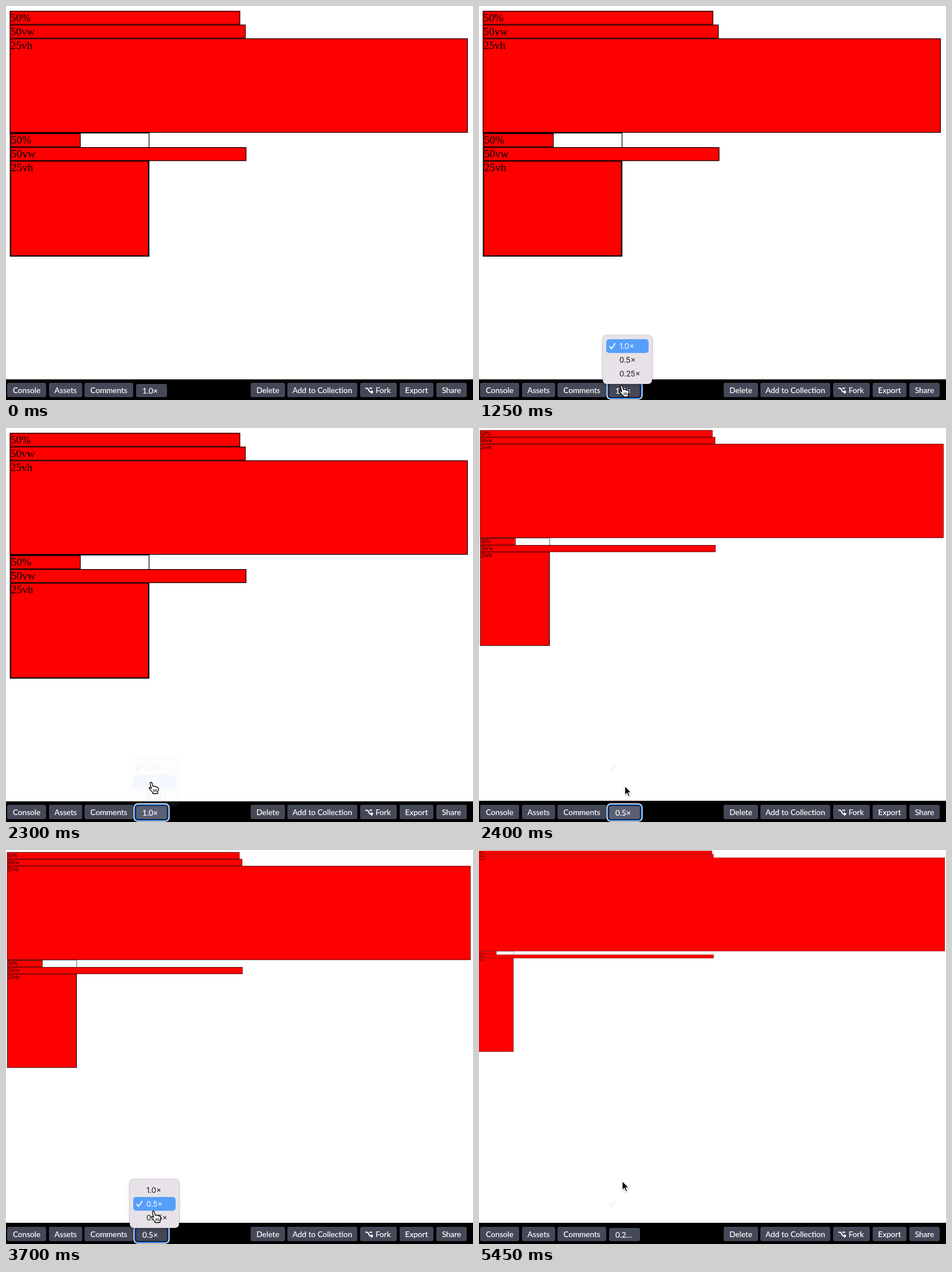
An HTML page for the animation above (5.55 s loop, 815 by 687 pixels).

```html
<!DOCTYPE html>
<html lang="en">
<head>
<meta charset="utf-8">
<title>Viewport units and zoom</title>
<style>
html, body { margin: 0; width: 100%; height: 100%; overflow: hidden; background: #fff; }
#stage { position: relative; width: 815px; height: 687px; overflow: hidden; --s: 1; }

.page {
  position: absolute; left: -3.5px; top: -.6px;
  box-sizing: border-box; width: calc(682px / var(--s)); padding: 8px;
  transform-origin: 0 0; transform: scale(calc(1.2 * var(--s)));
  font: 16px/18px "Liberation Serif", "Times New Roman", serif; color: #000;
}
.page div { border: 1px solid #000; }
.page .box { background: #f00; }
.page .half { width: 50%; }
.page .vw { width: calc(341px / var(--s)); }
.page .vh { height: calc(135.25px / var(--s)); }
.page .frame { width: 200.6px; }

.bar { position: absolute; left: 0; top: 651px; width: 815px; height: 36px; background: #000; }
.btn, #zoom {
  position: absolute; top: 657px; height: 25px; border-radius: 3px;
  background: #444857; color: #fff; white-space: nowrap;
  font: 13.6px/26px Lato, sans-serif; text-align: center;
  -webkit-text-stroke: .2px #fff;
}
.btn svg { position: absolute; left: 9px; top: 7px; }
#zoom { left: 227px; top: 659px; width: 43px; height: 23px; padding-left: 11px; line-height: 24px; text-align: left; }
#zoom.lit { background: #5a5f73; }
#zoom.focus { box-shadow: 0 0 0 1px #000, 0 0 0 3px #0d63d2, 0 0 0 4.5px #fff; }

#menu {
  position: absolute; left: 216px; top: 574px; width: 86px; height: 85px;
  border-radius: 7px; background: #e7e2e8;
  box-shadow: 0 0 0 .6px rgba(0,0,0,.25), 0 2px 6px rgba(0,0,0,.16);
}
.row {
  position: absolute; left: 6px; width: 51px; height: 24px; padding-left: 23px;
  border-radius: 5px; color: #1d1b1e; font: 13.2px/24px Inter, sans-serif;
}
.row.on { background: #559ffb; color: #fff; }
.row svg { position: absolute; left: 5px; top: 6px; visibility: hidden; }
.row.sel svg { visibility: visible; }

#cursor { position: absolute; left: 0; top: 0; overflow: visible; }
</style>
</head>
<body>
<div id="stage">
  <div class="page">
    <div class="box half">50%</div>
    <div class="box vw">50vw</div>
    <div class="box vh">25vh</div>
    <div class="frame">
      <div class="box half">50%</div>
      <div class="box vw">50vw</div>
      <div class="box vh" style="width:auto">25vh</div>
    </div>
  </div>

  <div class="bar" id="bar"></div>
  <div class="btn" style="left:2px;width:68px">Console</div>
  <div class="btn" style="left:75px;width:58px">Assets</div>
  <div class="btn" style="left:137px;width:85px">Comments</div>
  <div id="zoom"></div>
  <div class="btn" style="left:427px;width:60px">Delete</div>
  <div class="btn" style="left:491px;width:122px">Add to Collection</div>
  <div class="btn" style="left:618px;width:37px;padding-left:27px;text-align:left">
    <svg width="14" height="12" fill="none" stroke="#fff" stroke-width="1.8"><path d="M0 2.5h3C6 2.5 6 9 9 9h3M7 2.5h5M10.3 6.3 13 9l-2.7 2.7"/></svg>Fork</div>
  <div class="btn" style="left:687px;width:59px">Export</div>
  <div class="btn" style="left:751px;width:53px">Share</div>

  <div id="menu"></div>

  <svg id="cursor" width="1" height="1">
    <g id="arrow">
      <path d="M0 0V16.2L3.7 12.8 6.2 18.6 8.9 17.4 6.4 11.8H11.4Z" fill="#000" stroke="#fff" stroke-width="1.2" style="filter:drop-shadow(0 1px 1px rgba(0,0,0,.3))"/>
    </g>
    <g id="hand" stroke="#000" stroke-width="1.3" stroke-linejoin="round" stroke-linecap="round">
      <path fill="#fff" d="M-2 1.5C-2-.6.9-.9 1.3 1L3 7.2C4.3 5.9 6 6.4 6.3 7.6 7.7 6.6 9.2 7.4 9.4 8.6 11 7.9 12.3 8.8 12.4 10.4 12.5 13 12 14.5 11.3 16V19.5H2.6V17.8C.6 16-1 13.6-2.8 11.6-4.9 9.3-2.7 7.8-1 9.6L.3 10.9Z"/>
      <path fill="none" stroke-width="1" d="M4.2 12.3v4M6.6 12.3v4M9 12.3v4"/>
    </g>
  </svg>
</div>

<script>
const LOOP = 5550, STEP = 50;
const LEVELS = [1, 0.5, 0.25];
const LABELS = ['1.0×', '0.5×', '0.25×'];
const SHORT = ['1.0×', '0.5×', '0.2...'];

// Each pick: menu opens, row blinks off and on, menu has faded, zoom applies
const PICKS = [
  { open: 1250, off: 1950, on: 2100, gone: 2350, apply: 2400 },
  { open: 3100, off: 4350, on: 4500, gone: 4850, apply: 4900 }
];
const FADE = 200, BLUR = 5350;

// Pointer tip: time, x, y
const PATH = [
  [350, 10, 70], [900, 247, 665], [950, 247, 665], [1100, 249, 662], [1250, 249, 662],
  [1800, 253.5, 618], [2300, 253.5, 618], [2400, 254.5, 624], [2950, 249, 664],
  [3250, 249, 662], [3550, 256, 616], [3700, 257.5, 630], [3850, 258, 633],
  [4350, 259.5, 636.5], [4850, 259.5, 636.5], [5450, 250, 577]
];

const $ = id => document.getElementById(id);
const stage = $('stage'), zoom = $('zoom'), menu = $('menu'), cursor = $('cursor');

const rows = LABELS.map((label, i) => {
  const row = document.createElement('div');
  row.style.top = 7 + 24 * i + 'px';
  row.innerHTML = '<svg width="12" height="12" fill="none" stroke="currentColor" stroke-width="1.8" stroke-linecap="round" stroke-linejoin="round"><path d="M1.2 6.8 4.4 10.6 10.4 1.4"/></svg>' + label;
  menu.append(row);
  return row;
});

function pointer(t) {
  let i = PATH.findIndex(p => p[0] > t);
  if (i < 0) i = PATH.length;
  const a = PATH[Math.max(i - 1, 0)], b = PATH[i] || a;
  const u = b === a ? 0 : (t - a[0]) / (b[0] - a[0]);
  const e = u * u * (3 - 2 * u);
  return [a[1] + (b[1] - a[1]) * e, a[2] + (b[2] - a[2]) * e];
}

function draw(t) {
  const level = PICKS.filter(p => t >= p.apply).length;
  const pick = PICKS.find(p => t >= p.open && t < p.gone);
  const [x, y] = pointer(t);
  const over = t >= PATH[0][0] && x > 227 && x < 281 && y > 658;
  const focus = t >= PICKS[0].open && t < BLUR;

  stage.style.setProperty('--s', LEVELS[level]);
  $('bar').style.top = (level ? 650 : 651) + 'px';
  $('bar').style.height = (level ? 37 : 36) + 'px';

  zoom.textContent = SHORT[level];
  zoom.classList.toggle('focus', focus);
  zoom.classList.toggle('lit', (focus || over) && !(pick && t < pick.on));

  menu.style.visibility = pick ? 'visible' : 'hidden';
  if (pick) {
    const hover = y > 654 ? level : Math.max(0, Math.min(2, Math.floor((y - 582.5) / 24)));
    const blink = t >= pick.off && t < pick.on;
    menu.style.opacity = Math.min(1, (pick.gone - t) / FADE) ** 2;
    rows.forEach((row, i) => {
      row.className = 'row' + (i === hover && !blink ? ' on' : '') + (i === level ? ' sel' : '');
    });
  }

  const hand = over || !!pick;
  cursor.style.visibility = t >= PATH[0][0] ? 'visible' : 'hidden';
  cursor.style.transform = `translate(${x}px, ${y}px)`;
  $('hand').style.display = hand ? '' : 'none';
  $('arrow').style.display = hand ? 'none' : '';
}

const start = performance.now();
function tick(now) {
  const t = Math.max(0, now - start) % LOOP;
  draw(Math.floor(t / STEP) * STEP);
  requestAnimationFrame(tick);
}
draw(0);
requestAnimationFrame(tick);
</script>
</body>
</html>
```
